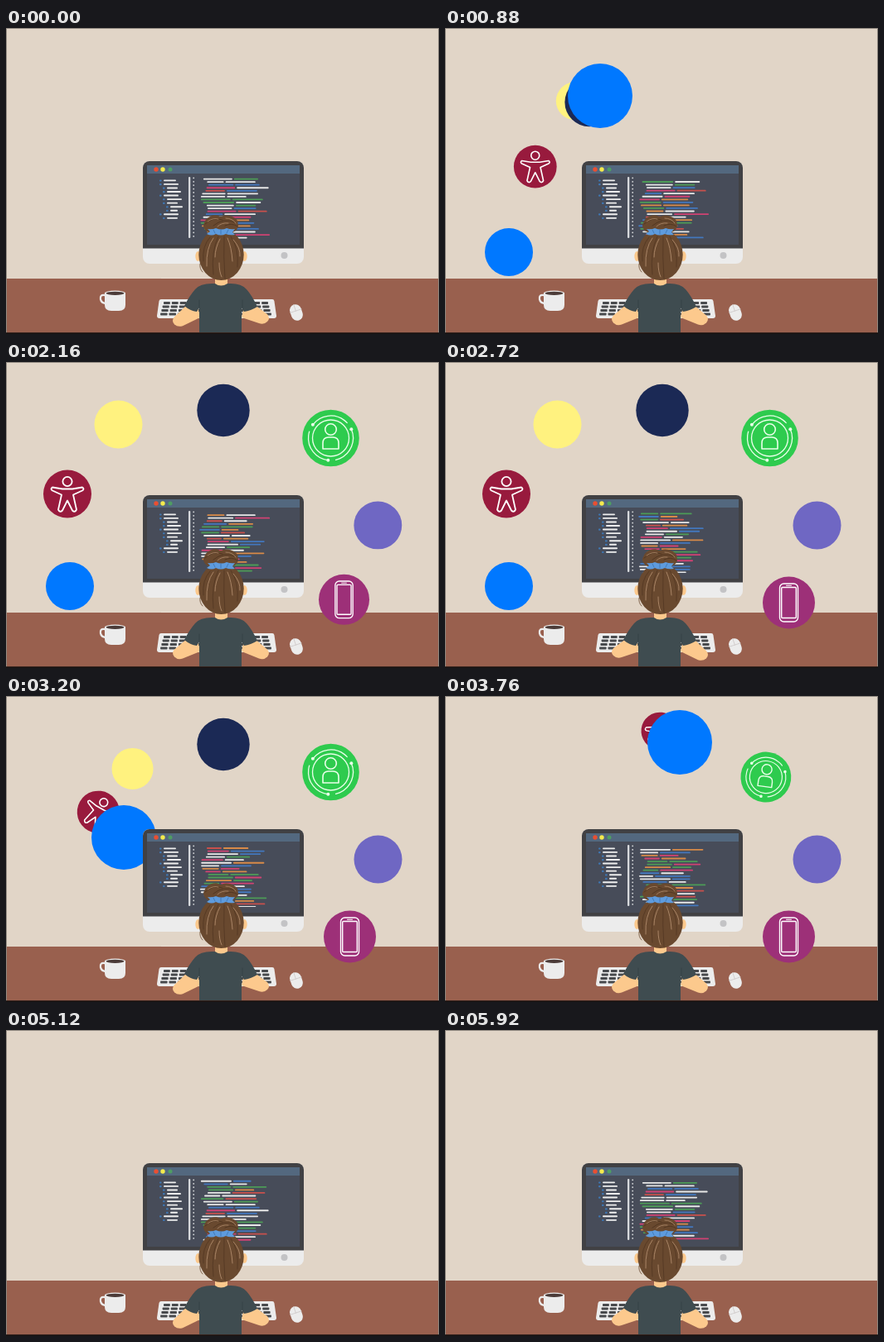
These frames come from a looping animation (522x370 px, 6 s). An HTML page with a canvas:

```html
<!DOCTYPE html>
<html lang="en">
<head>
<meta charset="utf-8">
<title>Coder at a desk</title>
<style>
html, body { margin: 0; width: 522px; height: 370px; overflow: hidden; background: #e1d5c7; }
canvas { display: block; }
</style>
</head>
<body>
<canvas id="stage" width="522" height="370"></canvas>
<script>
const ctx = document.getElementById('stage').getContext('2d');
const LOOP = 6000, STEP = 80, TAU = Math.PI * 2;
const WALL = '#e1d5c7', DESK = '#99604e', SKIN = '#fcc98d', BLUE = '#0078ff';

const clamp = v => Math.max(0, Math.min(1, v));
const mix = (a, b, k) => a + (b - a) * k;
const easeOut = k => 1 - (1 - k) ** 3;
const smooth = k => k * k * (3 - 2 * k);

function random(seed) {
  return () => {
    seed = (seed * 16807) % 2147483647;
    return seed / 2147483647;
  };
}

function rect(x, y, w, h, color, r = 0) {
  ctx.fillStyle = color;
  ctx.beginPath();
  ctx.roundRect(x, y, w, h, r);
  ctx.fill();
}

function oval(x, y, rx, ry, color, turn = 0) {
  ctx.fillStyle = color;
  ctx.beginPath();
  ctx.ellipse(x, y, rx, ry, turn, 0, TAU);
  ctx.fill();
}

const disc = (x, y, r, color) => oval(x, y, r, r, color);

function ring(x, y, r, from = 0, to = TAU) {
  ctx.beginPath();
  ctx.arc(x, y, r, from, to);
  ctx.stroke();
}

function shape(d, color) {
  ctx.fillStyle = color;
  ctx.fill(new Path2D(d));
}

function line(d, color, width) {
  ctx.strokeStyle = color;
  ctx.lineWidth = width;
  ctx.lineCap = 'round';
  ctx.lineJoin = 'round';
  ctx.stroke(new Path2D(d));
}

// Tracks of the leading disc: time, x, y. Both sweeps share the way down.
const descent = [
  [0, 283, 56], [80, 310, 62], [240, 365, 95], [360, 405, 140], [480, 425, 190],
  [600, 408, 252], [720, 349, 288], [800, 312, 291], [880, 265, 291]
];
const after = start => descent.map(([t, x, y]) => [t + start, x, y]);
const sweepIn = [
  [200, 225, 291], [320, 150, 288], [440, 106, 245], [560, 100, 187], [640, 112, 147],
  [720, 133, 120], [800, 160, 99], [880, 187, 82], [1040, 232, 62], ...after(1280)
];
const sweepOut = [
  [2800, 77, 271], [2920, 82, 255], [3040, 100, 220], [3200, 142, 171],
  [3340, 165, 118], [3440, 187, 84], [3600, 235, 62], ...after(3760)
];

function along(track, t) {
  const last = track.length - 1;
  if (t <= track[0][0]) return track[0].slice(1);
  if (t >= track[last][0]) return track[last].slice(1);
  let i = 0;
  while (track[i + 1][0] <= t) i++;
  const a = track[i], b = track[i + 1];
  const p = track[Math.max(0, i - 1)], n = track[Math.min(last, i + 2)];
  const span = b[0] - a[0], k = (t - a[0]) / span;
  return [1, 2].map(c => {
    const m0 = (b[c] - p[c]) / (b[0] - p[0]) * span;
    const m1 = (n[c] - a[c]) / (n[0] - a[0]) * span;
    return mix(a[c], b[c], smooth(k)) + k * (1 - k) * ((1 - k) * m0 - k * m1);
  });
}

function figure() {
  ctx.strokeStyle = '#fff';
  ctx.lineWidth = 1.8;
  ring(0, -15, 5.6);
  line('M-18 -8L-6 -6H6L18 -8Q21 -6 18 -4L7 1L11 19Q9 23 6 20L0 8L-6 20Q-9 23 -11 19L-7 1L-18 -4Q-21 -6 -18 -8Z', '#fff', 1.8);
}

function user() {
  ctx.strokeStyle = '#e9ffe9';
  ctx.lineWidth = 1.3;
  ring(0, 0, 22);
  for (let i = 0; i < 3; i++) {
    const a = -2.5 + i * TAU / 3;
    ring(0, 0, 27, a, a + 1.75);
    disc(27 * Math.cos(a), 27 * Math.sin(a), 2, '#e9ffe9');
  }
  ctx.lineWidth = 1.6;
  ring(0, -10.5, 6.8);
  line('M-9.5 13V6Q-9.5 -1 -2.5 -1H2.5Q9.5 -1 9.5 6V13Z', '#e9ffe9', 1.6);
}

function phone() {
  ctx.strokeStyle = '#fff';
  ctx.lineWidth = 1.4;
  ctx.beginPath();
  ctx.roundRect(-11, -23, 22, 46, 5);
  ctx.roundRect(-8.8, -18.5, 17.6, 37, 1);
  ctx.stroke();
  line('M-3 -20.7H3', '#fff', 1);
}

// dep/dur: leaving the leader; go/end: being collected again.
const badges = [
  { x: 77, y: 271, r: 29, color: BLUE, dep: 520, dur: 400, go: 2800, end: 2800 },
  { x: 74, y: 159.5, r: 29, color: '#981a3d', dep: 620, dur: 900, go: 3080, end: 3360, bend: [140, 178], spin: 1.3, icon: figure, trails: true },
  { x: 135.5, y: 75.5, r: 29, color: '#fff27f', dep: 820, dur: 500, go: 3040, end: 3380 },
  { x: 262, y: 58.5, r: 31.7, color: '#1b2955', dep: 1000, dur: 500, go: 3360, end: 3720, small: 0.93, lag: 40 },
  { x: 391.5, y: 92, r: 34.3, color: '#2ecb4e', dep: 1480, dur: 500, go: 3560, end: 4040, spin: 0.35, icon: user },
  { x: 448.5, y: 197.5, r: 29, color: '#6f67c3', dep: 1760, dur: 500, go: 3840, end: 4240 },
  { x: 414.5, y: 291, r: 31.5, color: '#9d3078', dep: 1940, dur: 540, go: 4040, end: 4400, small: 0.85, spin: 0.3, icon: phone }
];

function pose(b, t) {
  const small = b.small || 0.7;
  if (t < b.dep) {
    if (!b.lag || t < 640) return null;
    return [...along(sweepIn, t - b.lag), small, 0];
  }
  if (t < b.go) {
    const k = easeOut(clamp((t - b.dep) / b.dur));
    const [fx, fy] = along(sweepIn, b.dep - (b.lag || 0));
    const [cx, cy] = b.bend || [(fx + b.x) / 2, (fy + b.y) / 2];
    return [
      mix(mix(fx, cx, k), mix(cx, b.x, k), k),
      mix(mix(fy, cy, k), mix(cy, b.y, k), k),
      mix(small, 1, k), 0
    ];
  }
  if (t < b.end) {
    const k = smooth((t - b.go) / (b.end - b.go));
    const [ex, ey] = along(sweepOut, b.end);
    return [mix(b.x, ex, k), mix(b.y, ey, k), mix(1, 0.7, k), (b.spin || 0) * k];
  }
  if (b.trails && t < 4440) {
    const [x, y] = along(sweepOut, t - STEP);
    const a = Math.atan2(y - 200, x - 255), out = 15 * clamp((t - b.end) / 200);
    return [x + out * Math.cos(a), y + out * Math.sin(a), 0.78, b.spin];
  }
  return null;
}

function drawBadges(t) {
  for (const b of badges) {
    const p = pose(b, t);
    if (!p) continue;
    ctx.save();
    ctx.translate(p[0], p[1]);
    ctx.rotate(p[3]);
    ctx.scale(p[2], p[2]);
    disc(0, 0, b.r, b.color);
    if (b.icon) b.icon();
    ctx.restore();
  }
  if (t >= 200 && t < 2160) disc(...along(sweepIn, t), 39, BLUE);
  if (t >= 2800 && t < 4640) {
    disc(...along(sweepOut, t), mix(29, 39, smooth(clamp((t - 2800) / 400))), BLUE);
  }
}

const rnd = random(4127);
const inks = ['#4d9b57', '#4377bd', '#d88a48', '#d04273', '#e8e8e8', '#e8e8e8', '#4377bd', '#4d9b57', '#e8e8e8', '#c8504c'];
const PITCH = 3.55;
const rows = Array.from({ length: 48 }, (_, i) => {
  const ink = () => inks[Math.floor(rnd() * inks.length)];
  const x = 233 + 6 * (0.8 + 0.8 * Math.sin(i * 0.75)) + rnd() * 2;
  return { x, w: 17 + rnd() * 21, w2: 20 + rnd() * 24, a: ink(), b: ink() };
});

function drawCode(t) {
  ctx.save();
  ctx.beginPath();
  ctx.rect(230, 180, 122, 75);
  ctx.clip();
  const total = rows.length * PITCH, scroll = t / LOOP * total;
  rows.forEach((row, i) => {
    const y = 181.7 + ((i * PITCH - scroll) % total + total) % total;
    if (y > 256) return;
    rect(row.x, y, row.w, 1.8, row.a, 0.9);
    rect(row.x + row.w + 2, y, row.w2, 1.8, row.b, 0.9);
  });
  ctx.restore();
}

function drawMonitor(t) {
  rect(187, 282, 156, 21, WALL);
  rect(187, 303, 156, 40, DESK);
  rect(187, 302, 156, 1, '#e9dfd3');
  rect(165, 161, 194, 124, '#ececec', 8);
  rect(165, 161, 194, 105.5, '#414144', [8, 8, 0, 0]);
  rect(170, 166, 184, 96, '#474c59');
  rect(170, 166, 184, 10, '#53687f');
  disc(181, 171, 2.7, '#e94f32');
  disc(189, 171, 2.7, '#f4ea4d');
  disc(198, 171, 2.5, '#4f9d63');
  disc(335.5, 275, 4, '#c3c3c5');

  const tree = [[0, 15], [0, 18], [4, 13], [4, 17], [0, 18], [4, 18], [4, 13], [8, 15], [8, 9], [0, 18], [4, 13]];
  tree.forEach(([dx, w], i) => {
    const y = 183.4 + i * 4.55;
    rect(185 + dx, y, 2.6, 2.2, '#3f78b5', 1);
    rect(190 + dx, y, w, 1.9, '#eee', 1);
  });
  rect(220, 180, 2.3, 74, '#d7d9dc', 1);
  for (let i = 0; i < 17; i++) rect(225.3, 180.5 + i * 4.4, 1.8, 1.8, '#d7d9dc', 0.8);
  drawCode(t);
}

function drawDesk() {
  line('M119 323Q113 322 114 328Q115 333 121 333', '#ececec', 2.3);
  shape('M119 320H144V335Q144 342 136 342H127Q119 342 119 335Z', '#ececec');
  oval(131.5, 320.5, 12.5, 3, '#ececec');
  oval(131.5, 320.8, 11, 2.1, '#4b3b38');

  shape('M187 328H321Q323 328 323.4 330L326 348Q326 351 323 351H185Q182 351 182 348L184.5 330Q185 328 187 328Z', '#ececec');
  for (let row = 0; row < 4; row++) {
    const left = 190 - row * 1.3, n = 13, w = (254 - left) * 2 / n;
    for (let i = 0; i < n; i++) {
      const wide = row === 3 && i > 3 && i < 9;
      rect(left + i * w, 331 + row * 4.5, wide ? w : w - 2, 3, '#484a4d', 0.7);
    }
  }

  ctx.save();
  ctx.translate(350, 344);
  ctx.rotate(-0.32);
  rect(-7, -10, 14, 20, '#ececec', 7);
  line('M-7 -2H7M0 -10V-2', '#cfcaca', 0.8);
  ctx.restore();
}

function drawArm(side, lift) {
  ctx.save();
  ctx.translate(259, 0);
  ctx.scale(side, 1);
  shape(`M27 340L41 335L56 ${348 - lift}Q60 ${353 - lift} 56 ${357 - lift}Q52 ${361 - lift} 46 ${359 - lift}L25 350Z`, SKIN);
  ctx.restore();
}

function drawCoder(t) {
  const beat = t / 320 * TAU;
  drawArm(-1, 0.4 - 1.6 * Math.cos(beat));
  drawArm(1, 0.4 + 1.6 * Math.cos(beat));

  shape('M248 309H271Q284 309 290 316Q297 324 303 337Q295 342 287 343L284 338V368H233V338L230 343Q222 342 215 336Q221 324 228 316Q234 309 248 309Z', '#3f4c50');
  line('M233 329V343M285 329V343', '#374347', 1);
  shape('M252 298H267V309Q259 314 252 309Z', SKIN);
  oval(231.5, 276, 3.2, 6, SKIN);
  oval(287.5, 276, 3.2, 6, SKIN);

  const hair = '#69492f', shade = '#523722', glow = '#b08c6c';
  oval(259, 239, 21, 11, hair);
  oval(249, 233, 10, 6, hair, -0.4);
  oval(269, 233, 11, 6, hair, 0.3);
  oval(259.5, 274, 27.2, 31, hair);
  line('M240 237Q249 228 261 232M250 239Q262 229 276 235M264 239Q272 235 279 240', shade, 1);
  line('M243 234Q250 229 256 231M265 230Q273 230 277 236M255 240Q260 235 268 236', glow, 0.8);
  line('M246 253Q236 264 238 282M256 252Q247 270 250 298M263 252Q262 276 264 303M271 252Q281 266 279 289', shade, 0.8);
  line('M250 254Q241 266 242 288M258 255Q252 266 252 277M267 254Q272 265 273 282M274 256Q283 266 282 276M257 284Q257 295 260 301', glow, 0.9);
  line('M234 285Q233 291 237 295', hair, 0.8);

  shape('M243 243Q249 244 253 242Q260 245 266 242Q271 244 276 243L273 247L276 250Q269 251 265 249Q259 252 253 249Q248 252 242 249L246 246Z', '#5e9bdd');
  line('M250 244L252 248M259 244V249M268 244L266 248', '#3f78b6', 0.9);
}

function draw(t) {
  rect(0, 0, 522, 370, WALL);
  rect(0, 303, 522, 67, DESK);
  drawBadges(t);
  drawMonitor(t);
  drawDesk();
  drawCoder(t);
  rect(0, 0, 522, 1, '#8e867e');
  rect(0, 0, 1, 370, '#8e867e');
  rect(521, 0, 1, 370, '#8e867e');
  rect(0, 368.3, 522, 1.7, '#171211');
}

const start = performance.now();
function tick() {
  const t = (performance.now() - start) % LOOP;
  draw(Math.floor(t / STEP) * STEP);
  requestAnimationFrame(tick);
}
tick();
</script>
</body>
</html>
```
